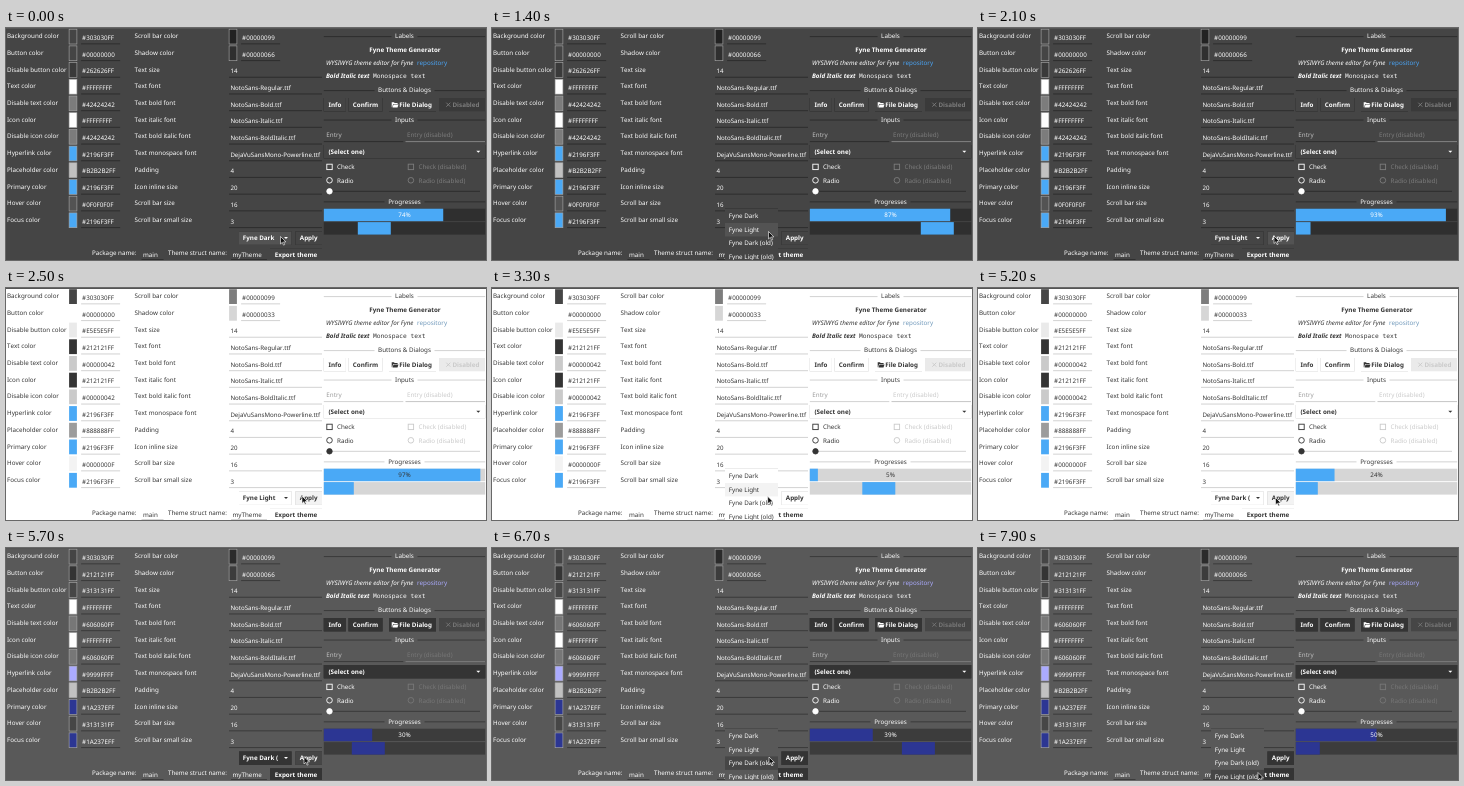
An HTML page that plays this animation: 480x232 px, repeating every 8 s.

```html
<!DOCTYPE html>
<html lang="en">
<head>
<meta charset="utf-8">
<title>Fyne Theme Generator</title>
<style>
  html, body { margin: 0; width: 100%; height: 100%; overflow: hidden; }
  svg { display: block; font: 6.25px "Noto Sans", sans-serif; font-kerning: none; text-rendering: geometricPrecision; }
  .b { font-weight: 700; }
  .i { font-style: italic; }
  .mono { font-family: "Noto Sans Mono", monospace; }
  .mid { text-anchor: middle; }
  .value { font-size: 6.15px; }
</style>
</head>
<body>
<svg id="stage" width="480" height="232" viewBox="0 0 480 232"></svg>
<script>
const stage = document.getElementById('stage');
const LOOP = 8000, ROW = 16.7, LEFT = 317.8, WIDTH = 161.4, MID = 398.5;

const colorNames = ['Background', 'Button', 'Disable button', 'Text', 'Disable text', 'Icon',
  'Disable icon', 'Hyperlink', 'Placeholder', 'Primary', 'Hover', 'Focus'];
const settings = [['Text size', 14], ['Text font', 'NotoSans-Regular.ttf'],
  ['Text bold font', 'NotoSans-Bold.ttf'], ['Text italic font', 'NotoSans-Italic.ttf'],
  ['Text bold italic font', 'NotoSans-BoldItalic.ttf'],
  ['Text monospace font', 'DejaVuSansMono-Powerline.ttf'],
  ['Padding', 4], ['Icon inline size', 20], ['Scroll bar size', 16], ['Scroll bar small size', 3]];
const choices = ['Fyne Dark', 'Fyne Light', 'Fyne Dark (old)', 'Fyne Light (old)'];

// Colours in the order of colorNames, then scroll bar and shadow (premultiplied RGBA).
const makeTheme = (bg, edge, link, list) => ({ bg, edge, link, list: list.split(' ') });
const dark = makeTheme('303030', '#aaa', '#4aa5f6', '303030FF 00000000 262626FF FFFFFFFF 42424242 FFFFFFFF 42424242 2196F3FF B2B2B2FF 2196F3FF 0F0F0F0F 2196F3FF 00000099 00000066');
const light = makeTheme('FFFFFF', 'none', '#6f98ba', '303030FF 00000000 E5E5E5FF 212121FF 00000042 212121FF 00000042 2196F3FF 888888FF 2196F3FF 0000000F 2196F3FF 00000099 00000033');
const oldDark = makeTheme('424242', '#aaa', '#ababff', '303030FF 212121FF 313131FF FFFFFFFF 606060FF FFFFFFFF 606060FF 9999FFFF B2B2B2FF 1A237EFF 313131FF 1A237EFF 00000099 00000066');

// Steps of 100 ms during which the picture rests.
const still = [15, 18, 22, 23, 24, 27, 28, 34, 48, 49, 53, 54, 55, 56, 58, 60, 68];
const clicks = [4, 5, 16, 20, 32, 41, 42, 50, 51, 66];
const progress = [[0, 74], [14, 87], [25, 97], [41, 113], [52, 124], [57, 130], [79, 150]];
const travel = [[0, 67], [14, 144], [25, 208], [41, 319], [52, 378], [57, 417], [79, 558]];
const pointer = [[0, 274.5, 208.5], [6, 275, 208.5], [10, 276, 196], [14, 276.5, 203.5],
  [18, 276.5, 203.5], [21, 296, 208], [28, 296, 208], [32, 276, 209], [35, 275, 207],
  [41, 274, 215], [43, 274, 215], [47, 297.5, 209.5], [52, 297.5, 209.5], [57, 298, 208.5],
  [60, 298, 208.5], [65, 277, 209], [69, 277, 209], [77, 279, 219], [79, 280, 224.5]];

function at(keys, n) {
  const j = Math.max(1, keys.findIndex(k => k[0] >= n));
  const a = keys[j - 1], b = keys[j], f = (n - a[0]) / (b[0] - a[0]);
  return a.slice(1).map((v, k) => v + (b[k + 1] - v) * f);
}

// Flattens a colour onto the background, in the lifted, slightly muted tones of the screen.
function flatten(hex, bg) {
  const part = (s, k) => parseInt(s.slice(2 * k, 2 * k + 2), 16);
  const rest = 1 - part(hex, 3) / 255;
  const rgb = [0, 1, 2].map(k =>
    255 * Math.min(1, (part(hex, k) + part(bg, k) * rest) / 255) ** 0.78);
  const least = 0.3 * Math.max(...rgb);
  return `rgb(${rgb.map(v => Math.round(Math.max(v, least)))})`;
}

function scene(n) {
  const theme = n < 25 ? dark : n < 57 ? light : oldDark;
  const tone = theme.list.map(c => flatten(c, theme.bg));
  const [, button, offButton, fg, off, , , , hint, primary, hover] = tone;
  const bg = flatten(theme.bg + 'FF', theme.bg), shadow = tone[13];
  const face = theme === oldDark ? button : bg;

  const text = (x, y, s, cls = '', fill = fg) =>
    `<text x="${x}" y="${y + 2.2}" class="${cls}" fill="${fill}">${s}</text>`;
  const rect = (x, y, w, h, fill, more = '') =>
    `<rect x="${x}" y="${y}" width="${w}" height="${h}" fill="${fill}" ${more}/>`;
  const path = (d, fill = fg, more = '') => `<path d="${d}" fill="${fill}" ${more}/>`;
  const ring = (x, y, r, color, fill = 'none') =>
    `<circle cx="${x}" cy="${y}" r="${r}" fill="${fill}" stroke="${color}" stroke-width=".9"/>`;
  const raised = `style="filter:drop-shadow(0 0 .5px ${shadow}) drop-shadow(0 .6px .5px ${shadow})"`;
  const box = (x, y, w, h, fill = face) => rect(x, y, w, h, fill, raised);
  const line = (x, y, w, fill = shadow) => rect(x, y, w, 1.1, fill);
  const arrow = (x, y) => path(`M${x - 2} ${y - 1}h4l-2 2z`);
  const swatch = (x, y, k) =>
    rect(x, y, 7.8, 14.8, tone[k], `stroke="${theme.edge}" stroke-width=".6"`);
  const heading = (s, y, half) => text(MID, y, s, 'mid') +
    line(LEFT, y, MID - half - LEFT) + line(MID + half, y, MID - half - LEFT);

  const [x, y] = at(pointer, n);
  const open = n >= 6 && n < 17 || n >= 33 && n < 43 || n >= 67;
  const inside = (l, r) => !open && x > l && x < r && y > 202 && y < 217;
  const chosen = n < 17 ? 'Fyne Dark' : n < 43 ? 'Fyne Light' : 'Fyne Dark (';
  let out = rect(0, 0, 480, 232, bg) + rect(0, 0, 480, 1, '#555');

  // Theme fields
  const colorField = (x0, row, k) => swatch(x0, row * ROW + 1.2, k) +
    text(x0 + 13, 9.6 + row * ROW, '#' + theme.list[k]) + line(x0 + 12, 15.3 + row * ROW, 39);
  colorNames.forEach((name, k) => {
    out += text(1, 8 + k * ROW, name + ' color') + colorField(63.1, k, k);
  });
  ['Scroll bar color', 'Shadow color'].forEach((name, k) => {
    out += text(128.5, 8 + k * ROW, name) + colorField(223.1, k, 12 + k);
  });
  settings.forEach(([name, value], k) => {
    const top = (k + 2) * ROW;
    out += text(128.5, 8 + top, name) + text(224.4, 9.6 + top, value, 'value') +
      line(223, 15.3 + top, 93);
  });

  // Bottom rows
  out += box(233, 203.5, 52.5, 13.3, inside(233, 286) ? hover : face) +
    text(236.8, 210, chosen, 'b') + arrow(280, 210) +
    box(289.5, 203.5, 26.5, 13.3, inside(289, 316) ? hover : face) + text(302.7, 210, 'Apply', 'b mid') +
    text(86, 225, 'Package name:') + text(137, 226.5, 'main') + line(135.5, 231, 22) +
    text(162, 225, 'Theme struct name:') + text(226.5, 226.5, 'myTheme') + line(225, 231, 36) +
    box(264, 220.3, 52, 13, face) + text(290, 226.5, 'Export theme', 'b mid');

  // Labels
  out += heading('Labels', 8, 13) + text(MID + .5, 21.5, 'Fyne Theme Generator', 'b mid') +
    text(320, 35, 'WYSIWYG theme editor for Fyne', 'i') + text(411, 35, 'repository', '', theme.link) +
    text(320, 48, 'Bold Italic text', 'b i') + text(367, 47.3, 'Monospace text', 'mono');

  // Buttons
  out += heading('Buttons &amp; Dialogs', 62, 30) +
    box(LEFT, 70, 22, 13.3) + text(329, 76.7, 'Info', 'b mid') +
    box(342.5, 70, 34, 13.3) + text(359.5, 76.7, 'Confirm', 'b mid') +
    box(383, 70, 47, 13.3) + text(393.3, 76.7, 'File Dialog', 'b') +
    path('M385.7 74.2h2.2l.8.9h2.9v.9h-4.5l-.9 3.2h-.5zM387.5 76.5h5l-1 2.9h-4.9z') +
    rect(433, 70, 46, 13.3, offButton) + text(446.5, 76.7, 'Disabled', 'b', off) +
    path('M440.3 74.7l4 4m0-4l-4 4', 'none', `stroke="${off}" stroke-width=".9"`);

  // Inputs
  const square = (x0, color) => rect(x0, 136.2, 5.4, 5.4, 'none', `stroke="${color}" stroke-width=".9"`);
  out += heading('Inputs', 91.5, 13) +
    text(320.3, 107, 'Entry', '', hint) + line(LEFT, 113, 79.5) +
    text(401, 107, 'Entry (disabled)', '', off) + line(399.5, 113, 79.5, off) +
    box(LEFT, 117, WIDTH, 13.3) + text(322.5, 123.5, '(Select one)', 'b') + arrow(472.3, 123.7) +
    square(320.8, fg) + text(331, 139, 'Check') +
    square(402.2, off) + text(412.5, 139, 'Check (disabled)', '', off) +
    ring(323.5, 152.3, 2.8, fg) + text(331, 152.3, 'Radio') +
    ring(404.9, 152.3, 2.8, off) + text(412.5, 152.3, 'Radio (disabled)', '', off) +
    line(324, 162.8, 150) + ring(323.5, 163.3, 2.7, fg, fg);

  // Progress bars
  const percent = Math.floor(at(progress, n)[0] + .01) % 100;
  const phase = at(travel, n)[0] % 178, head = phase < 8 ? phase + 8 : phase;
  const tail = Math.max(0, head - 33);
  const bar = (x0, y0, w, fill) => rect(x0, y0, w, 12.5, fill);
  out += heading('Progresses', 173.3, 20) +
    bar(LEFT, 180.7, WIDTH, shadow) + bar(LEFT, 180.7, WIDTH * percent / 100, primary) +
    text(MID, 187, percent + '%', 'mid') +
    bar(LEFT, 194.1, WIDTH, shadow) + bar(LEFT + tail, 194.1, Math.min(head, WIDTH) - tail, primary);

  // Menu and pointer
  if (open) {
    const picked = Math.floor((y - 181.5) / 13.45);
    out += box(233, 180.5, 53, 56, bg) + rect(233, 181.5 + picked * 13.45, 53, 13.45, hover);
    choices.forEach((name, k) => { out += text(236.8, 188 + k * 13.45, name); });
  }
  if (clicks.includes(n)) out += ring(x - .5, y, 8, theme === light ? '#222' : '#000');
  return out + path('M0 0v7.5l1.8-1.7 1.2 2.8 1.2-.5-1.2-2.7h2.4z', '#111',
    `transform="translate(${x} ${y})" stroke="#fff" stroke-width=".6"`);
}

let shown = -1;
function tick(now) {
  let n = Math.floor(now % LOOP / 100);
  while (still.includes(n)) n--;
  if (n !== shown) stage.innerHTML = scene(shown = n);
  requestAnimationFrame(tick);
}
tick(performance.now());
</script>
</body>
</html>
```
